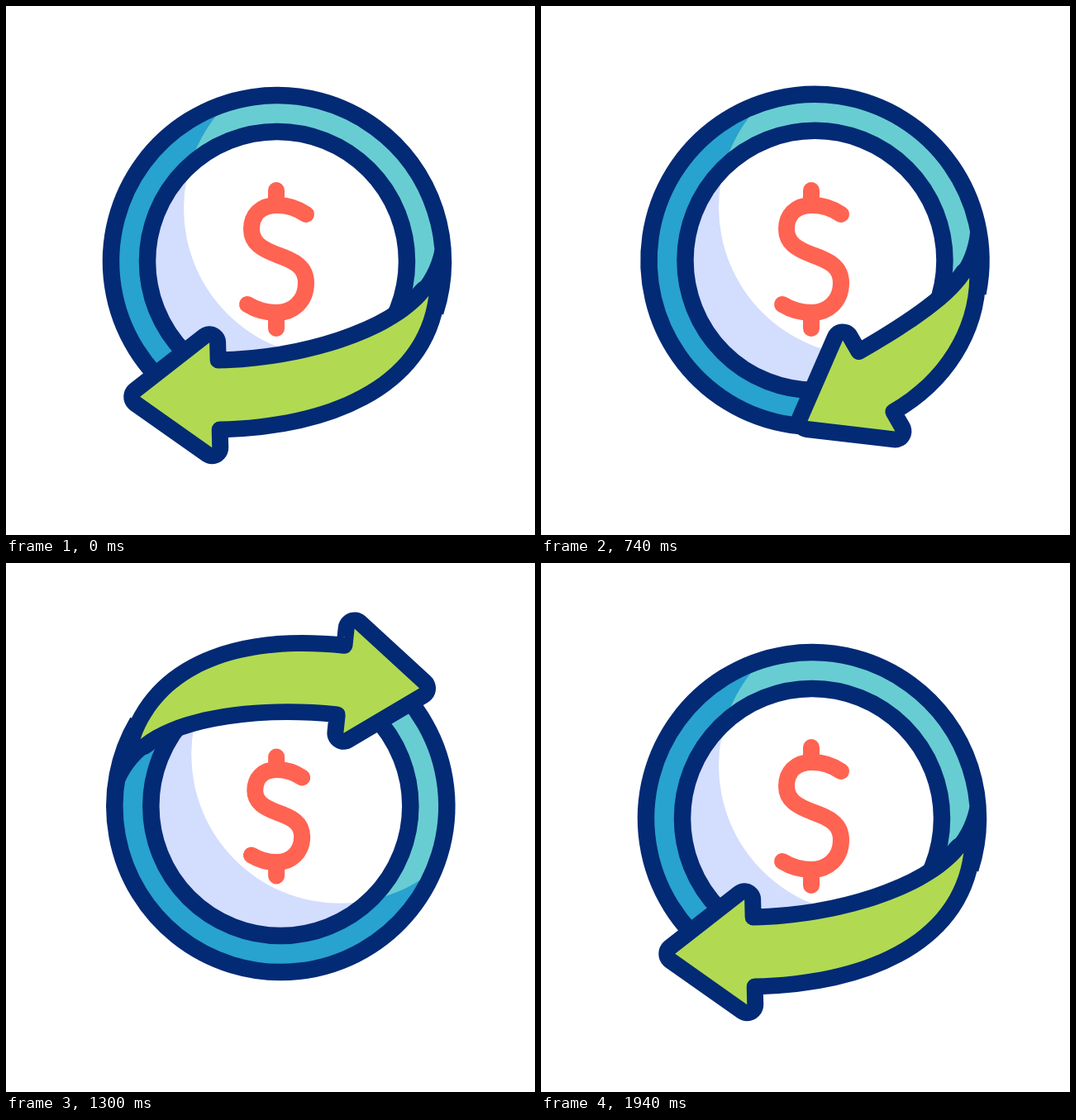
Write an HTML page with a canvas that moves like this. It is 640 px wide and 640 px high and loops after 2 s.

```html
<!DOCTYPE html>
<html lang="en">
<head>
<meta charset="utf-8">
<title>Refund</title>
<style>
html, body { margin: 0; width: 100%; height: 100%; overflow: hidden; background: #fff; }
canvas { display: block; width: 640px; height: 640px; }
</style>
</head>
<body>
<canvas id="stage" width="640" height="640"></canvas>
<script>
const ctx = document.getElementById('stage').getContext('2d');
const LOOP = 2000, RAD = Math.PI / 180;
const NAVY = '#032a75', TEAL = '#68cdd2', BLUE = '#28a2ce', LILAC = '#d3ddfd',
  GREEN = '#b1da52', RED = '#ff6352', WHITE = '#fff';

// time, ring x, ring y, tail angle, arrow span, glare x, glare y, dollar scale
const keys = [
  [160, 328, 309, 12.8, 103.6, 395, 245, 1],
  [580, 331, 308, 9.1, 68.9, 395, 243, 1],
  [920, 331.7, 307.7, 4.2, 55.5, 395, 244, 1],
  [1160, 318, 302, 90, 74.2, 400, 236, 0.92],
  [1220, 320, 297, 138, 82, 402, 234, 0.895],
  [1290, 331, 294, 197, 92, 404, 232, 0.865],
  [1440, 345, 299, 304.2, 103.3, 406, 229.5, 0.835],
  [1600, 331, 309.5, 373.8, 104, 397, 240, 1.07],
  [1780, 329.5, 309, 373.1, 103.7, 395.5, 244, 1.01],
  [1940, 328, 309, 372.8, 103.6, 395, 245, 1]
];

const dollar = new Path2D('M327 223V240M327 372V390M363 252Q347 241 328 241' +
  'C307 241 297 254 297 270C297 287 310 294 328 301C348 308 363 315 363 335' +
  'C363 358 346 371 328 371Q308 371 292 361');

const secant = (i, c) => (keys[i + 1][c] - keys[i][c]) / (keys[i + 1][0] - keys[i][0]);

function slope(i, c) {
  if (i === 0 || i === keys.length - 1) return 0;
  const p = secant(i - 1, c), q = secant(i, c);
  return p * q > 0 ? 2 * p * q / (p + q) : 0;
}

// Monotone cubic interpolation of every column
function poseAt(t) {
  const last = keys.length - 1;
  t = Math.min(Math.max(t, keys[0][0]), keys[last][0]);
  let i = 0;
  while (i < last - 1 && t > keys[i + 1][0]) i++;
  const a = keys[i], b = keys[i + 1], h = b[0] - a[0], u = (t - a[0]) / h, v = 1 - u;
  return a.map((from, c) => from * v * v * (1 + 2 * u) + b[c] * u * u * (3 - 2 * u) +
    h * u * v * (slope(i, c) * v - slope(i + 1, c) * u)).slice(1);
}

const polar = (r, deg) => [r * Math.cos(deg * RAD), r * Math.sin(deg * RAD)];

function circle(x, y, r) {
  ctx.beginPath();
  ctx.arc(x, y, r, 0, 7);
}

function disc(x, y, r, color) {
  circle(x, y, r);
  ctx.fillStyle = color;
  ctx.fill();
}

// A lit disc with a crescent of shade, cut to the ring
function shaded(r, light, dark, gx, gy) {
  disc(0, 0, r, light);
  ctx.save();
  circle(0, 0, r);
  ctx.clip();
  disc(gx - 67, gy + 64, r, dark);
  disc(gx, gy, 180, light);
  ctx.restore();
}

function drawRing(tail, span, gx, gy) {
  shaded(201, TEAL, BLUE, gx, gy);
  shaded(157, WHITE, LILAC, gx, gy);
  ctx.strokeStyle = NAVY;
  ctx.lineWidth = 20.5;
  circle(0, 0, 157);
  ctx.stroke();
  ctx.beginPath();
  ctx.arc(0, 0, 201, (tail + span + 10) * RAD, (tail + 365) * RAD);
  ctx.stroke();

  // Taper joining the arrow's tail to the ring
  ctx.beginPath();
  ctx.moveTo(...polar(167, tail));
  ctx.quadraticCurveTo(...polar(185, tail - 8), ...polar(191, tail - 17));
  ctx.arc(0, 0, 205, (tail - 17) * RAD, (tail + 3) * RAD);
  ctx.fillStyle = NAVY;
  ctx.fill();
}

function drawArrow(tail, span) {
  const k = span / 104;
  const [bx, by] = polar(165 + 16 * ((span - 55) / 49) ** 3, tail + span);
  const [ux, uy] = polar(1, tail + span + 62 + (104 - span) * 0.49);
  const [rx, ry] = polar(1, tail);
  const head = (f, s) => [bx + ux * f - uy * s, by + uy * f + ux * s];
  const tip = (out, along) => [rx * (188 + out) - ry * along, ry * (188 + out) + rx * along];
  const inner = head(-113 * k, 32), outer = head(-138 * k, -32);

  ctx.beginPath();
  ctx.moveTo(...head(85.5, 0));
  ctx.lineTo(...head(0, 63.5));
  ctx.arcTo(...head(0, 32), ...inner, 10);
  ctx.bezierCurveTo(...inner, ...tip(-30 * k, 61 * k), ...tip(0, 0));
  ctx.bezierCurveTo(...tip(10 * k, 105 * k), ...outer, ...head(-10, -32));
  ctx.arcTo(...head(0, -32), ...head(0, -63.5), 10);
  ctx.lineTo(...head(0, -63.5));
  ctx.closePath();
  ctx.lineWidth = 40;
  ctx.lineJoin = 'round';
  ctx.strokeStyle = NAVY;
  ctx.stroke();
  ctx.fillStyle = GREEN;
  ctx.fill();
}

function drawDollar(scale) {
  ctx.save();
  ctx.translate(328, 306.5);
  ctx.scale(scale, scale);
  ctx.translate(-328, -306.5);
  ctx.lineWidth = 20 / scale;
  ctx.lineCap = ctx.lineJoin = 'round';
  ctx.strokeStyle = RED;
  ctx.stroke(dollar);
  ctx.restore();
}

function draw(t) {
  const [cx, cy, tail, span, gx, gy, scale] = poseAt(t);
  ctx.fillStyle = WHITE;
  ctx.fillRect(0, 0, 640, 640);
  ctx.save();
  ctx.translate(cx, cy);
  drawRing(tail, span, gx - cx, gy - cy);
  drawArrow(tail, span);
  ctx.restore();
  drawDollar(scale);
}

const start = performance.now();
function tick() {
  draw((performance.now() - start) % LOOP);
  requestAnimationFrame(tick);
}
tick();
</script>
</body>
</html>
```
